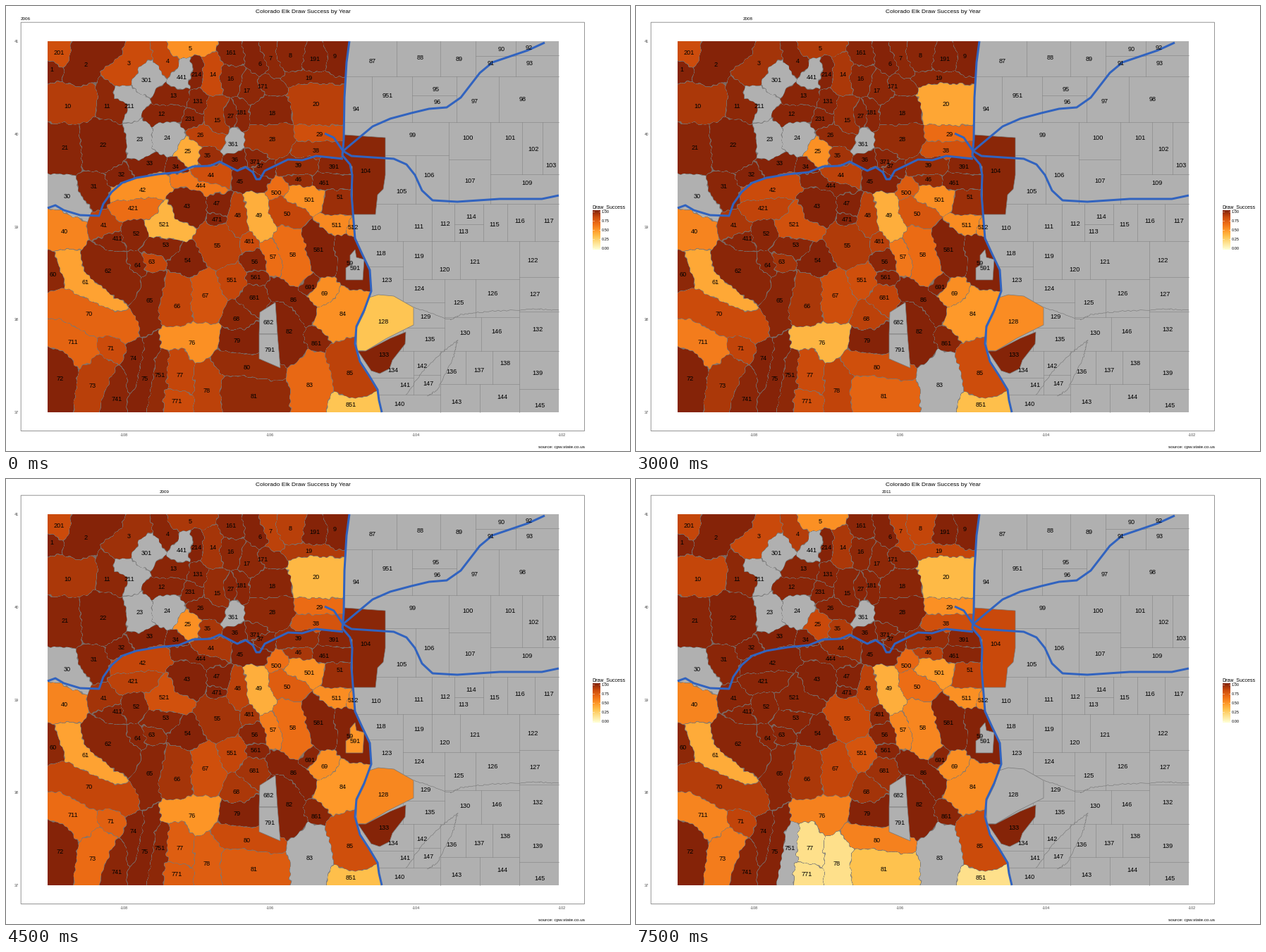
A matplotlib script for the animation above (8 s loop, 885 by 632 pixels).

```python
import random
import numpy as np
import matplotlib.pyplot as plt
from matplotlib.animation import FuncAnimation
from matplotlib.colors import LinearSegmentedColormap, to_rgb
from matplotlib.patches import Polygon, Rectangle

W, H, DPI = 885, 632, 100
LEFT, RIGHT, TOP, BOTTOM = 59, 784, 50, 577
EAST = 540          # the mountain raster ends here
YEARS = 6
PX = 72 / DPI
NA = -1
GREY, EDGE, RIVER = "#b0b0b0", "#777777", "#3163bf"
HEAT = LinearSegmentedColormap.from_list(
    "heat", ["#ffffd4", "#fee391", "#fec24d", "#fe9627", "#ec6c15", "#c9490b", "#822208"])

plt.rcParams["font.family"] = "Liberation Sans"
fig = plt.figure(figsize=(W / DPI, H / DPI), dpi=DPI, facecolor="white")
ax = fig.add_axes([0, 0, 1, 1])
ax.axis("off")


def text(x, y, s, size=9.2, ha="center", color="black"):
    return ax.text(x, y + 0.36 * size, s, fontsize=size * PX, ha=ha,
                   va="baseline", color=color, zorder=6)


def pairs(flat):
    return np.reshape(flat, (-1, 2)).astype(float)


def by_year(rates):
    """One rate, a few evenly spaced rates, or one per year."""
    rates = np.atleast_1d(rates)
    return np.interp(np.arange(YEARS), np.linspace(0, YEARS - 1, len(rates)), rates)


def colour(rate):
    return to_rgb(GREY) if rate == NA else HEAT(rate / 100)[:3]


def road(flat):
    p = pairs(flat)
    ax.plot(*p.T, color=RIVER, lw=3 * PX, zorder=5,
            solid_joinstyle="round", solid_capstyle="butt")
    return p


def creek(*flat):
    p = pairs(flat)
    t = np.linspace(0, len(p) - 1, 14 * len(p))
    k = np.arange(len(p))
    rng = np.random.default_rng(4)
    x, y = (np.interp(t, k, c) + rng.uniform(-1, 1, len(t)) for c in p.T)
    ax.plot(x, y, color="#777777", lw=0.6 * PX, zorder=2)


# ---- frame, title, axes
ax.add_patch(Rectangle((21.2, 23.2), 799.3, 580.3, fc="white", ec="#8a8a8a", lw=0.9 * PX, snap=False))
text(421, 6.5, "Colorado Elk Draw Success by Year", 8.44)
text(821, 625.5, "source: cpw.state.co.us", 6.32, "right")
year = text(28, 17.5, "2006", 6.3)
for i in range(5):
    text(18, 50 + 131.75 * i, str(41 - i), 5.6, "right", "#4d4d4d")
for i in range(4):
    text(167 + 207.1 * i, 609, str(2 * i - 108), 5.6, color="#4d4d4d")
ax.add_patch(Rectangle((LEFT, TOP), RIGHT - LEFT, BOTTOM - TOP, fc=GREY, ec="none"))

# ---- blue lines
front_range = road([487, 50, 483, 80, 480, 130, 479, 190, 477, 212, 488, 225, 491, 240, 490, 268,
                    495, 330, 505, 352, 516, 375, 518, 405, 508, 432, 497, 455, 495, 480,
                    502, 505, 515, 525, 527, 545, 529, 560, 533, 577])
road([59, 287, 70, 283, 82, 290, 105, 297, 132, 298, 138, 281, 150, 264, 165, 251, 185, 244,
      215, 239, 245, 236, 265, 228, 290, 227, 303, 221, 328, 234, 340, 229, 350, 236, 355, 246,
      360, 246, 367, 234, 400, 218, 420, 219, 440, 213, 478, 217])
road([478, 206, 520, 171, 545, 160, 575, 152, 600, 146, 625, 144, 645, 130, 672, 95, 690, 80,
      740, 63, 764, 52])
road([452, 181, 465, 187, 478, 206, 490, 213, 550, 217, 568, 225, 580, 240, 590, 262, 605, 276,
      640, 278, 700, 274, 760, 274, 784, 269])

# ---- mountains: every pixel belongs to the nearest spine, less its radius
cells = []


def cell(name, x, y, r, rates=99, *spine):
    text(x, y, name)
    cells.append((r, by_year(rates), pairs(spine or (x, y))))


cell("1", 65, 90, 8)
cell("2", 113, 83, 15, 99, 145, 62, 108, 68, 105, 97)
cell("201", 75, 66, 14, (80, 84))
cell("3", 174, 81, 13, (82, 92, 92, 93, 93, 83), 188, 65, 160, 98)
cell("4", 229, 78, 9, (84, 97, 98, 98, 97, 88), 220, 60, 228, 82)
cell("5", 261, 60, 9, (52, 88, 89, 90, 93, 52), 240, 57, 282, 58)
cell("6", 360, 82, 8, 99, 347, 60, 362, 84)
cell("7", 375, 74, 7, (97, 97, 97, 86, 79, 85), 370, 58, 382, 92)
cell("8", 403, 70, 17, (98, 98, 98, 87, 80, 84))
cell("9", 466, 71, 10, 99, 470, 60, 470, 90)
cell("191", 438, 75, 13)
cell("19", 429, 102, 5, (96, 96, 97, 89, 87, 84), 404, 104, 470, 104)
cell("10", 87, 142, 19, (88, 92, 90, 90, 85, 84), 75, 139, 110, 134)
cell("11", 143, 142, 10, 97, 143, 120, 140, 142, 158, 148)
cell("12", 220, 153, 9, 98, 205, 155, 240, 152)
cell("13", 237, 127, 8, 98, 218, 129, 248, 129)
cell("14", 293, 97, 10, (83, 92, 90), 292, 80, 293, 113)
cell("15", 299, 162, 9, (91, 98), 296, 140, 302, 172)
cell("16", 318, 103, 14, 97)
cell("161", 319, 66, 14, 98)
cell("17", 341, 120, 8, 97, 343, 108, 350, 128)
cell("171", 364, 114, 7, 97, 370, 108, 388, 120)
cell("18", 377, 152, 17, 98, 365, 152, 392, 147)
cell("181", 334, 151, 6, 98, 336, 145, 334, 162)
cell("131", 272, 135, 11, 98)
cell("231", 261, 160, 10, 98)
cell("214", 270, 97, 6, 99, 271, 80, 269, 105)
cell("441", 249, 101, 7, NA, 259, 87, 247, 107)
cell("301", 199, 105, 13, NA, 203, 97, 197, 115)
cell("211", 175, 142, 7, NA, 160, 122, 193, 132, 180, 157)
cell("23", 190, 189, 14, NA, 188, 178, 190, 202)
cell("24", 229, 187, 19, NA)
cell("20", 440, 139, 28, (87, 79, 44, 37, 32, 36), 428, 139, 460, 140)
cell("21", 84, 201, 28, 98, 75, 202)
cell("22", 138, 197, 29)
cell("25", 258, 206, 15, (42, 50, 52, 52, 86, 83))
cell("26", 276, 183, 9, (86, 94, 96, 98, 98, 98), 272, 184, 298, 188)
cell("27", 319, 156, 10, 98)
cell("28", 378, 189, 18, (91, 96, 99), 365, 188, 390, 187)
cell("29", 445, 182, 9, (80, 60, 67, 67, 52, 52), 420, 181, 470, 181)
cell("30", 87, 270, 16, NA, 72, 262, 97, 284)
cell("31", 125, 256, 18, 98, 127, 264)
cell("32", 164, 239, 8, 99, 155, 247, 168, 238)
cell("33", 204, 223, 8, 99, 185, 229, 212, 222)
cell("34", 241, 228, 8)
cell("35", 286, 212, 10, (94, 89))
cell("36", 325, 218, 8)
cell("361", 322, 196, 6, NA, 322, 187, 320, 200)
cell("371", 353, 221, 8, 98, 356, 213)
cell("37", 361, 227, 6, 98, 366, 231)
cell("38", 440, 205, 9, (90, 93, 79, 78, 79, 80), 418, 203, 470, 202)
cell("39", 415, 226, 9, 95, 403, 228, 430, 226)
cell("391", 465, 228, 7, 98, 455, 226, 482, 228)
cell("46", 415, 246, 5, (95, 95, 95, 91, 88, 87), 406, 247, 427, 249)
cell("461", 451, 251, 7, 98, 445, 249, 480, 251)
cell("51", 474, 271, 17, (94, 94, 94, 94, 88, 85), 464, 281, 478, 279)
cell("40", 83, 320, 25, 57, 80, 318)
cell("41", 139, 311, 14, (86, 88, 90, 92, 98, 98))
cell("411", 158, 330, 12, 98, 148, 336)
cell("42", 194, 261, 11, (52, 83, 82, 84, 99, 99), 160, 266, 218, 255)
cell("421", 180, 287, 10, (66, 80, 85, 86, 98, 98), 163, 287, 205, 286)
cell("43", 257, 284, 22)
cell("44", 291, 240, 9, (80, 86, 86, 90, 85, 95), 280, 240, 308, 244)
cell("444", 276, 255, 5, (62, 97, 98, 98, 98, 98), 242, 246, 302, 261)
cell("45", 332, 249, 9, 99, 332, 246, 360, 255)
cell("47", 299, 280, 13, 99, 303, 280)
cell("471", 299, 303, 6)
cell("48", 329, 297, 9, 86, 329, 283, 330, 315)
cell("481", 345, 334, 9, (82, 84, 87, 91, 97, 97))
cell("49", 359, 297, 13, 41, 354, 278, 363, 316)
cell("50", 399, 295, 15, (84, 66), 390, 289, 408, 298)
cell("500", 383, 265, 7, (66, 77, 74, 65, 67, 69), 378, 263, 394, 260)
cell("501", 430, 275, 13, (52, 54, 53, 52, 46, 48), 410, 269, 440, 276)
cell("511", 469, 311, 11, (55, 52), 455, 308, 475, 308)
cell("512", 492, 314, 7, 55)
cell("52", 185, 323, 14, 98)
cell("521", 224, 310, 11, (38, 52, 79, 79, 98, 98), 228, 295, 212, 316, 246, 318)
cell("53", 227, 339, 10, 98, 207, 341, 237, 343)
cell("54", 258, 361, 20)
cell("55", 300, 340, 26, (86, 88, 89, 92, 84, 82))
cell("551", 320, 389, 16, (84, 90, 80, 84, 76, 77))
cell("56", 353, 363, 12, 98)
cell("561", 354, 385, 9, 98)
cell("57", 379, 356, 9, (66, 56), 376, 345, 383, 366)
cell("58", 407, 353, 18, (66, 68, 67, 66, 57, 56), 401, 334, 412, 371)
cell("581", 443, 346, 17, 99, 440, 328, 450, 362)
cell("59", 488, 365, 14, 99, 482, 345, 495, 388)
cell("60", 67, 381, 9, 97, 63, 365, 68, 391)
cell("61", 113, 392, 10, (45, 40, 43, 45, 45, 42), 84, 358, 100, 392, 155, 424)
cell("62", 145, 376, 22, 98, 138, 366, 166, 396)
cell("63", 207, 363, 11, (84, 88, 92, 96, 98, 98))
cell("64", 187, 368, 10, 98)
cell("65", 204, 418, 13, 98, 210, 395, 195, 432, 200, 455)
cell("66", 243, 426, 18, (84, 92, 90), 243, 402, 240, 433)
cell("67", 283, 411, 17, (78, 84, 80, 80, 84, 84), 283, 398, 285, 426)
cell("68", 327, 444, 15, (97, 79, 86, 90, 92, 92))
cell("681", 352, 414, 15, (97, 79, 85, 92, 93, 93))
cell("69", 452, 408, 16, 53)
cell("691", 431, 399, 9, 98, 434, 395)
cell("70", 118, 437, 18, (70, 78, 82, 84, 88, 88), 78, 425, 120, 441, 172, 456)
cell("71", 149, 486, 15, (82, 92, 85, 72, 84, 85))
cell("711", 95, 477, 15, (70, 52, 60, 67, 57, 57), 75, 462, 112, 490)
cell("72", 77, 529, 18, 99, 72, 512, 78, 560)
cell("73", 123, 539, 16, (87, 97, 90, 67, 58, 60), 133, 515, 114, 562)
cell("74", 181, 500, 9, 99, 186, 485, 178, 535)
cell("741", 157, 558, 11, 98, 163, 532, 150, 566)
cell("75", 197, 529, 9, 99, 208, 472, 188, 560)
cell("751", 218, 524, 7, (96, 96, 97, 97, NA, NA), 221, 500, 213, 565)
cell("76", 264, 478, 11, (52, 52, 38, 50, 52, 58), 230, 472, 290, 470, 268, 492)
cell("77", 247, 524, 15, (84, 82, 82, 73, 85, 18), 248, 506, 248, 533)
cell("771", 242, 561, 16, (82, 83, 80, 74, 83, 18))
cell("78", 285, 546, 15, (86, 85, 85, 73, 85, 18), 285, 523, 290, 562)
cell("79", 328, 475, 13, 99, 318, 474, 348, 474)
cell("80", 342, 513, 11, (95, 77, 80, 82, 82, 58), 307, 506, 382, 520)
cell("81", 352, 554, 24, (96, 63, 70, 74, 74, 33), 328, 553, 378, 556)
cell("82", 402, 462, 17, 99, 393, 440, 404, 492)
cell("83", 431, 538, 25, (68, NA, NA, NA, NA, NA), 430, 520, 430, 556)
cell("84", 478, 437, 25, (52, 48, 54), 487, 428, 466, 446)
cell("85", 488, 521, 22, (86, 80, 82), 482, 500, 495, 533)
cell("851", 489, 566, 9, (32, 33, 34, 34, 30, 18), 468, 566, 522, 568)
cell("86", 408, 417, 9, 99, 384, 403, 428, 436)
cell("861", 440, 479, 13, 98, 442, 472)

gx, gy = np.meshgrid(np.arange(LEFT, EAST) + 0.5, np.arange(TOP, BOTTOM) + 0.5)
inside = gx < np.interp(gy, front_range[:, 1], front_range[:, 0])

# small seeded waves bend the borders like ridges
rng = random.Random(7)
wx, wy = gx.copy(), gy.copy()
for _ in range(14):
    a, f = rng.uniform(0, 2 * np.pi), rng.uniform(0.25, 0.9)
    wave = 0.45 * np.sin(f * (gx * np.cos(a) + gy * np.sin(a)) + rng.uniform(0, 6))
    b = rng.uniform(0, 2 * np.pi)
    wx += wave * np.cos(b)
    wy += wave * np.sin(b)


def spine_distance(pts):
    out = np.full(gx.shape, np.inf)
    for (x0, y0), (x1, y1) in zip(pts, pts[1:] if len(pts) > 1 else pts):
        dx, dy = x1 - x0, y1 - y0
        t = np.clip(((wx - x0) * dx + (wy - y0) * dy) / (dx * dx + dy * dy or 1), 0, 1)
        out = np.minimum(out, np.hypot(wx - x0 - t * dx, wy - y0 - t * dy))
    return out


best, second = np.full(gx.shape, np.inf), np.full(gx.shape, np.inf)
owner = np.zeros(gx.shape, int)
for k, (r, _, pts) in enumerate(cells):
    d = spine_distance(pts) - r
    second = np.minimum(second, np.maximum(best, d))
    owner[d < best] = k
    best = np.minimum(best, d)
line = 0.85 * np.clip(1.4 - (second - best), 0, 1)[..., None]
extent = (LEFT, EAST, BOTTOM, TOP)
land = ax.imshow(np.zeros(gx.shape + (4,)), extent=extent, aspect="auto",
                 interpolation="nearest", zorder=3)

# ---- units with straight sides
blocks = []


def block(name, x, y, rates, *flat):
    text(x, y, name)
    patch = Polygon(pairs(flat), ec=EDGE, lw=0.7 * PX, zorder=4)
    blocks.append((ax.add_patch(patch), by_year(rates)))


block("104", 510, 234, (98, 98, 98, 98, 89, 83), 480, 183, 538, 187, 538, 240, 535, 260, 527, 268,
      524, 296, 492, 296, 491, 228, 478, 213)
block("128", 535, 448, (32, 52, 54, 56, NA, NA), 515, 414, 528, 410, 550, 412, 578, 428, 578, 453,
      540, 472, 510, 490, 498, 489, 497, 458, 508, 436)
block("133", 536, 495, 99, 499, 490, 510, 490, 545, 472, 567, 463, 566, 480, 548, 503, 544, 515,
      530, 522, 518, 518)
block("591", 495, 372, (NA, NA, NA, 50, 56, NA), 482, 372, 488, 368, 488, 354, 495, 346, 497, 357,
      508, 360, 506, 389, 482, 389)
block("682", 372, 449, NA, 360, 435, 382, 421, 385, 466, 359, 466)
block("791", 374, 488, NA, 359, 466, 385, 466, 389, 514, 359, 501)

# ---- plains: labels parted again and again at the widest gap
north = [(87, 520, 78), (88, 588, 73), (89, 643, 75), (90, 703, 61), (91, 688, 81), (92, 742, 59),
         (93, 743, 81), (951, 541, 127), (95, 610, 118), (96, 612, 136), (97, 665, 135),
         (98, 733, 132), (94, 497, 146), (99, 577, 183), (100, 655, 187), (101, 715, 187),
         (102, 748, 203), (103, 773, 226), (105, 561, 263), (106, 600, 240), (107, 658, 248),
         (109, 739, 251), (110, 525, 315), (111, 585, 313), (112, 623, 309), (113, 649, 320),
         (114, 660, 299), (115, 693, 310), (116, 729, 305), (117, 770, 305)]
south = [(118, 532, 351), (119, 586, 355), (120, 622, 374), (121, 665, 363), (122, 747, 361),
         (123, 540, 389), (124, 586, 401), (125, 642, 421), (126, 690, 408), (127, 750, 409),
         (129, 595, 441), (130, 651, 464), (132, 754, 459), (134, 549, 517), (135, 601, 473),
         (136, 632, 519), (137, 671, 517), (138, 708, 507), (139, 754, 521), (140, 558, 565),
         (141, 566, 538), (142, 590, 511), (143, 639, 562), (144, 704, 555), (145, 757, 567),
         (146, 696, 462), (147, 599, 536)]


def part(pts, lo, hi):
    if len(pts) < 2:
        return
    gaps = []
    for axis in (0, 1):
        v = np.sort(pts[:, axis])
        k = np.argmax(np.diff(v))
        gaps.append((v[k + 1] - v[k], axis, (v[k] + v[k + 1]) / 2))
    _, axis, cut = max(gaps)
    start, end = list(lo), list(hi)
    start[axis] = end[axis] = cut
    ax.plot([start[0], end[0]], [start[1], end[1]], color="#858585", lw=0.6 * PX, zorder=2)
    part(pts[pts[:, axis] < cut], lo, end)
    part(pts[pts[:, axis] > cut], start, hi)


for group, top, bottom in ((north, TOP, 334), (south, 334, BOTTOM)):
    for name, x, y in group:
        text(x, y, str(name))
    part(np.array(group, float)[:, 1:], [480, top], [RIGHT, bottom])
ax.plot([495, RIGHT], [334, 334], color="#858585", lw=0.6 * PX, zorder=2)
creek(578, 428, 630, 446, 645, 438, 680, 434, 750, 430, 784, 432)
creek(640, 475, 618, 492, 590, 520, 568, 552)
creek(640, 475, 634, 500, 612, 545, 598, 554)

# ---- legend
text(831, 285, "Draw_Success", 7.05, "left")
ax.imshow(np.linspace(1, 0, 256)[:, None], cmap=HEAT, extent=(832, 843, 346, 290), aspect="auto")
for i in range(5):
    y = 291.5 + 13.1 * i
    text(845, y, f"{1 - i / 4:.2f}", 5.6, "left")
    for x in (832, 841):
        ax.plot([x, x + 2], [y, y], color="white", lw=0.5 * PX)
ax.set_xlim(0, W)
ax.set_ylim(H, 0)


def draw(frame):
    step = frame // 3
    year.set_text(str(2006 + step))
    year.set_x(28 + 65.45 * step)
    fills = np.array([colour(rates[step]) for _, rates, _ in cells])
    rgb = fills[owner] * (1 - line) + np.array(to_rgb(EDGE)) * line
    land.set_data(np.dstack([rgb, inside]))
    for patch, rates in blocks:
        patch.set_facecolor(colour(rates[step]))


anim = FuncAnimation(fig, draw, frames=16, interval=500, init_func=lambda: draw(0),
                     repeat=True, repeat_delay=0, blit=False)
plt.show()
```
